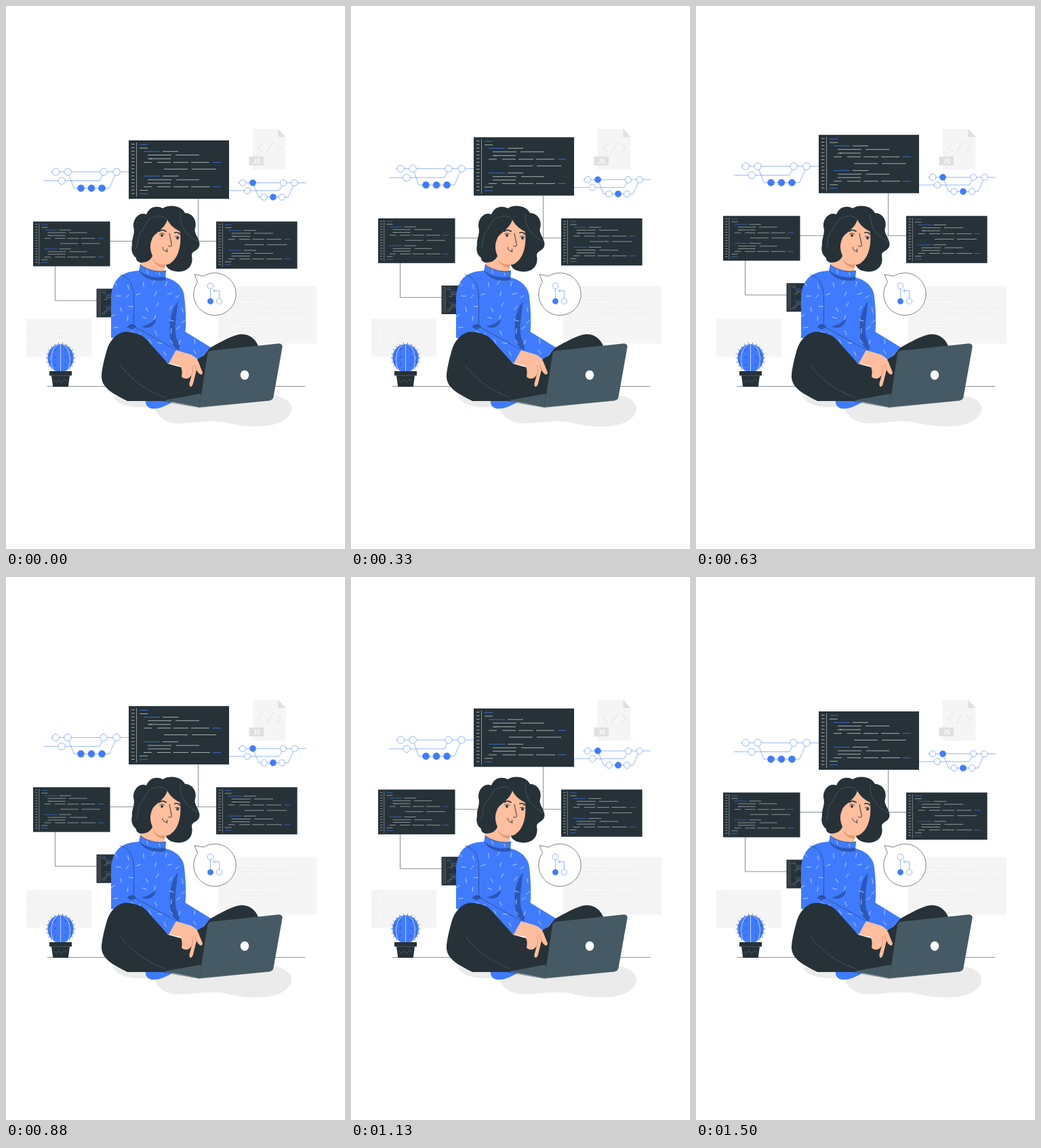
Recreate the animation shown at these times as an HTML page. Size 500 by 800 pixels, loop 1.54 s.

```html
<!DOCTYPE html>
<html lang="en">
<head>
<meta charset="utf-8">
<title>Coding illustration</title>
<style>
html, body { margin: 0; width: 100%; height: 100%; overflow: hidden; background: #fff; }
svg { display: block; width: 500px; height: 800px; }
.ink { fill: #263238; }
.blue { fill: #407bff; }
.navy { fill: #2d57b5; }
.skin { fill: #ffbe9d; }
.line { fill: none; stroke: #263238; stroke-width: .55; stroke-linecap: round; stroke-linejoin: round; }
.brow { stroke-width: 1.8; }
.trait { stroke-width: .95; }
.wire { fill: none; stroke: #407bff; stroke-width: .55; }
.fold { fill: none; stroke: #5b7077; stroke-width: .55; }
.dash { fill: none; stroke: #d5e2ff; stroke-width: .8; stroke-linecap: round; }
</style>
</head>
<body>
<svg viewBox="0 0 500 800">
  <defs>
    <clipPath id="knit"><path id="torso" d="M198 381C207 389 225 393 236 390L235 400C250 403 262 414 263 428C265 445 266 466 264.500 480L302 503L285 521L250 508L240 527L190 491L155 489L155 430C156 412 162 391 196 390Z"/></clipPath>
    <clipPath id="ball"><ellipse cx="80.5" cy="518.5" rx="19.3" ry="20.5"/></clipPath>
  </defs>

  <path d="M157 575C165 588 182 592 207 591L219 593C224 605 233 612 247 614.5C275 617 300 607 330 615C360 622 398 622 414 607C428 594 422 578 393 573Z" fill="#ebebeb"/>
  <path class="line" d="M61 560.4H441"/>

  <g id="far"></g>
  <g>
    <path d="M364 181H401.5L412.5 193V241H364Z" fill="#f5f5f5"/>
    <path d="M401.5 181V193H412.5Z" fill="#e0e0e0"/>
    <path d="M379 202L371.5 208.5L379 215M394 200.5L383.500 216.500M398.500 202L406 208.500L398.500 215" fill="none" stroke="#e2e2e2"/>
    <path d="M358.500 221.700H380V234.800H358.500Z" fill="#e0e0e0"/>
    <text x="369.800" y="231.900" text-anchor="middle" font-family="Lato, sans-serif" font-size="10" font-weight="700" fill="#fff">JS</text>
  </g>

  <g id="float">
    <path class="line" d="M283.500 284V346.500M153 346.500H310M72.500 383V434H134"/>
    <g id="near"></g>
    <g id="graphs">
      <path class="wire" d="M66 244.300H181M56 257.500H138L144 244.300M91 244.300L100 268.400H152.500L163 244.300"/>
      <path class="wire" d="M342 260.500H442M329 272H403L409 260.500M364 260.500L372.500 281.500H416L425.500 260.500"/>
    </g>
  </g>

  <g id="cactus">
    <path id="spikes" class="line"/>
    <ellipse class="blue" cx="80.500" cy="518.500" rx="19.300" ry="20.500"/>
    <g clip-path="url(#ball)">
      <path d="M80.500 498V539M78 498C64 505 64 530 72 539M83 498C97 505 97 530 89 539" fill="none" stroke="#dbe6ff" stroke-width=".8"/>
      <path class="line" d="M74 505L72 508M87 505L89 508M74 516L72 519M87 516L90 519M74 527L72 530M87 527L89 530M66 512L64 515M95 512L97 515M66 523L64 526M95 523L97 526"/>
    </g>
    <path class="ink" d="M64 538H97V544.500H94L91.800 561H69.300L67 544.500H64Z"/>
    <path class="fold" d="M67 544.500H94M70 551L74 554L78 550L82 555L86 550L91 553"/>
  </g>

  <g id="bubble">
    <path d="M278 395.500L291.500 398A31.200 31.200 0 1 1 282.500 406.500Z" fill="#fff" stroke="#263238" stroke-width=".6"/>
    <path class="wire" d="M301.500 417V430.500M314.500 430.500V419.500H306M308.500 417L306 419.500L308.500 422"/>
  </g>

  <g id="person">
    <path class="blue" d="M206 580C207 573 215 570 223 572L247 582C239 588 226 594 216 593.300C208 592 205 587 206 580Z"/>
    <path class="ink" d="M186 352C185 342 191 336 188 325C187 313 197 303 207 307C211 296 222 293 231 298C243 291 259 295 264 305C276 305 282 317 279 327C276 336 288 344 285 354C283 361 273 361 274 368C277 382 268 391.500 254 391.500C243 391 236 386 235 379L216 371C211 382 191 380 192 371C186 367 184 359 186 352Z"/>
    <path class="skin" d="M238 315C242 323 250 329 256.500 332C259 347 256 363 249.500 372C244 379 239 382 234.500 381L233 392C220 397 204 390 197 383L199.500 378C208 378 214 374 216 368C212 359 212 351 215.500 343C219 334 233 330 238 315Z"/>
    <path d="M216 372C221 380 229 382 235 380.500L234 386C226 385 218 380 216 372Z" fill="#e89a6f"/>
    <path class="fold" d="M257 306C256 322 264 338 284 347M238 315C233 309 226 308 218 311C207 312 206 327 197 335C193 344 196 352 191 358"/>
    <path class="line brow" d="M226 332C229 329.500 233 330 236 332M249 334C252 333 255 334 256 336"/>
    <path class="line trait" d="M226.500 336C229 334 232 334.500 234 336.500M249.500 340C252 338.500 254 339 256 341M241 335L244.500 353C243 354.500 241 354.500 239.500 353.500M231 355.500C231 359 234 361.500 237.500 361.500M237.500 358V362.500"/>
    <circle class="ink" cx="230" cy="338" r="1.900"/><circle class="ink" cx="253" cy="342" r="1.900"/>

    <use href="#torso" class="blue"/>
    <g clip-path="url(#knit)">
      <path class="navy" d="M196 389C205 398 222 402 236 398L235 404C219 407 202 402 196 389Z"/>
      <path class="navy" d="M254 435C244 446 240 465 242 480C241 492 245 502 255 508L256 500C247 484 250 469 251 458C252 448 253 441 254 435Z"/>
      <path class="navy" d="M200 472C208 470 216 467 221 460C222 470 211 478 200 472ZM179 473C183 467 189 467 192 473L185 477Z"/>
      <path id="flecks" class="dash"/>
    </g>
    <path class="blue" d="M198 381C207 389 225 393 236 390L235 398C222 402 204 398 197 388Z"/>
    <path class="dash" d="M208 389L209 394M226 393L227 397"/>
    <path class="line" d="M198 381C207 389 225 393 236 390M168 396C186 400 189 416 188.500 438V469M179 473C184 469 189 470 192 474C214 486 234 497 251 507"/>

    <path class="ink" d="M272 556L287 520L301 503.500C315 496 334 484.500 347 483.500C360 483 370 492 373 504L292 578Z"/>
    <path class="ink" d="M141 548C140 538 147 512 150 503C154 492 164 481 176 480C189 480 200 484 207 491L239 527L261 533L300 510L296 573L236 582H179C162 573 143 565 141 548Z"/>
    <path class="fold" d="M169 530C184 549 204 566 235 577"/>
    <path class="blue" d="M190 474C211 486 231 497 251 507L240 527L206 490Z"/>
    <path class="dash" d="M211 491L214 497M224 496L230 497M233 509L236 515"/>
    <path class="skin" d="M251 507L271 513C280 516 284 523 286 530L290 540C289 546 284 542 281 536L276 556C274 563 270 562 270.500 556L274 543C270 551 262 550 259 546C260 540 260 535 257 530L240 526.500Z"/>
    <path d="M274 543C276 539 276 534 274 529M281 536L278 528" fill="none" stroke="#c87f59" stroke-width=".6"/>
  </g>

  <g id="laptop">
    <path d="M233 581L288 571L285 591Z" fill="#455a64"/>
    <path d="M301 508L402 497.300Q408.500 497.500 407.500 503L394.500 576Q393.500 580.500 389 581L285 591L297 512Q297.700 508.500 301 508Z" fill="#455a64"/>
    <path class="line" d="M233 582.500L285 591.300L389 581M301 508Q297.700 508.500 297 512L285 591"/>
    <ellipse cx="352" cy="543.700" rx="6.300" ry="7" fill="#fff"/>
  </g>
</svg>

<script>
const $ = id => document.getElementById(id);

function add(parent, tag, attrs) {
  const el = document.createElementNS('http://www.w3.org/2000/svg', tag);
  for (const key in attrs) el.setAttribute(key, attrs[key]);
  return parent.appendChild(el);
}

// Each row: y, then spans as start-end; "b" marks a highlighted span.
const rows = [
  '6 16-28b', '11.3 16-28', '16.3 22-46b 50-73', '21.5 28-63 69-104', '27 28-34 31-62',
  '32.4 22-34 42-62 66-88 92-119 124-136b', '42.3 52-87 93-129', '52.6 22-46b 50-73',
  '58 28-63 70-104', '63 28-62', '68.3 22-34 42-62 66-88 92-120 124-136b', '73.5 16-28', '78.7 16-28b'
];

function panel(parent, x, y, scale, faint) {
  const g = add(parent, 'g', { transform: `translate(${x} ${y}) scale(${scale})` });
  const plain = faint ? '#ececec' : '#c9cdcf';
  const bright = faint ? plain : '#4379ef';
  const stroke = (d, color, width) => add(g, 'path', { d, stroke: color, 'stroke-width': width });
  add(g, 'rect', { width: 148, height: 86, fill: faint ? '#f5f5f5' : '#263238' });
  stroke('M11.500 3V83', plain, .65);
  for (let i = 0; i < 15; i++) stroke(`M4 ${5.5 + i * 5.2}h4.500`, plain, .8);
  for (const row of rows) {
    const [top, ...spans] = row.split(' ');
    for (const span of spans) {
      const [from, to] = span.split('-').map(parseFloat);
      stroke(`M${from} ${top}H${to}`, span.endsWith('b') ? bright : plain, .8);
    }
  }
}

panel($('far'), 312.5, 412.4, .986, true);
panel($('far'), 30, 461, .65, true);
panel($('near'), 181, 198, 1);
panel($('near'), 40, 317.5, .767);
panel($('near'), 310, 317.5, .808);
panel($('near'), 133.5, 416.5, .49);

function nodes(parent, y, r, xs, solid = []) {
  for (const cx of xs) {
    add(parent, 'circle', { cx, cy: y, r, fill: solid.includes(cx) ? '#407bff' : '#fff', stroke: '#407bff', 'stroke-width': .55 });
  }
}

const graphs = $('graphs'), bubble = $('bubble');
nodes(graphs, 244.3, 5.2, [73.5, 91, 144, 163]);
nodes(graphs, 257.5, 5.2, [82]);
nodes(graphs, 268.4, 5, [110.5, 126, 141.5], [110.5, 126, 141.5]);
nodes(graphs, 260.5, 4.6, [349, 364, 409, 425.5], [364]);
nodes(graphs, 272, 4.6, [356]);
nodes(graphs, 281.5, 4.6, [380.5, 394, 407], [394]);
nodes(bubble, 412.5, 4.4, [301.5]);
nodes(bubble, 435, 4.2, [301.5, 314.5], [301.5]);

let spikes = '';
for (let i = 0; i < 22; i++) {
  const a = i / 22 * Math.PI * 2, c = Math.cos(a), s = Math.sin(a);
  spikes += `M${80.5 + 18 * c} ${518.5 + 19 * s}L${80.5 + 21.5 * c} ${518.5 + 22.5 * s}`;
}
$('spikes').setAttribute('d', spikes);

let seed = 11;
const rand = () => (seed = seed * 16807 % 2147483647) / 2147483647;
let flecks = '';
for (let y = 403; y < 515; y += 17) {
  for (let x = 160; x < 300; x += 19) {
    const px = x + rand() * 9, py = y + rand() * 9, a = rand() * Math.PI;
    flecks += `M${px} ${py}l${6.5 * Math.cos(a)} ${6.5 * Math.sin(a)}`;
  }
}
$('flecks').setAttribute('d', flecks);

// Lift of the floating group: [step, pixels], 24 steps per second.
const lift = [[0, 0], [8, 4.65], [15, 8.2], [18, 8.6], [21, 7.8], [27, 4.3], [32, 1.45], [36, 0], [37, 0]];
const LOOP = 1540;

function slope(i) {
  const a = lift[Math.max(i - 1, 0)], b = lift[Math.min(i + 1, lift.length - 1)];
  return (b[1] - a[1]) / (b[0] - a[0]);
}

function liftAt(step) {
  const i = lift.findIndex((p, n) => n < lift.length - 1 && step < lift[n + 1][0]);
  const [x0, y0] = lift[i], [x1, y1] = lift[i + 1];
  const w = x1 - x0, u = (step - x0) / w, v = 1 - u;
  return v * v * ((1 + 2 * u) * y0 + u * w * slope(i)) + u * u * ((3 - 2 * u) * y1 - v * w * slope(i + 1));
}

const group = $('float'), start = performance.now();
function draw(now) {
  const t = Math.max(0, now - start) % LOOP;
  const step = Math.ceil((Math.floor(t / 10) + .5) * .24) - 1;
  group.setAttribute('transform', `translate(0 ${-liftAt(step).toFixed(2)})`);
  requestAnimationFrame(draw);
}
draw(start);
</script>
</body>
</html>
```
